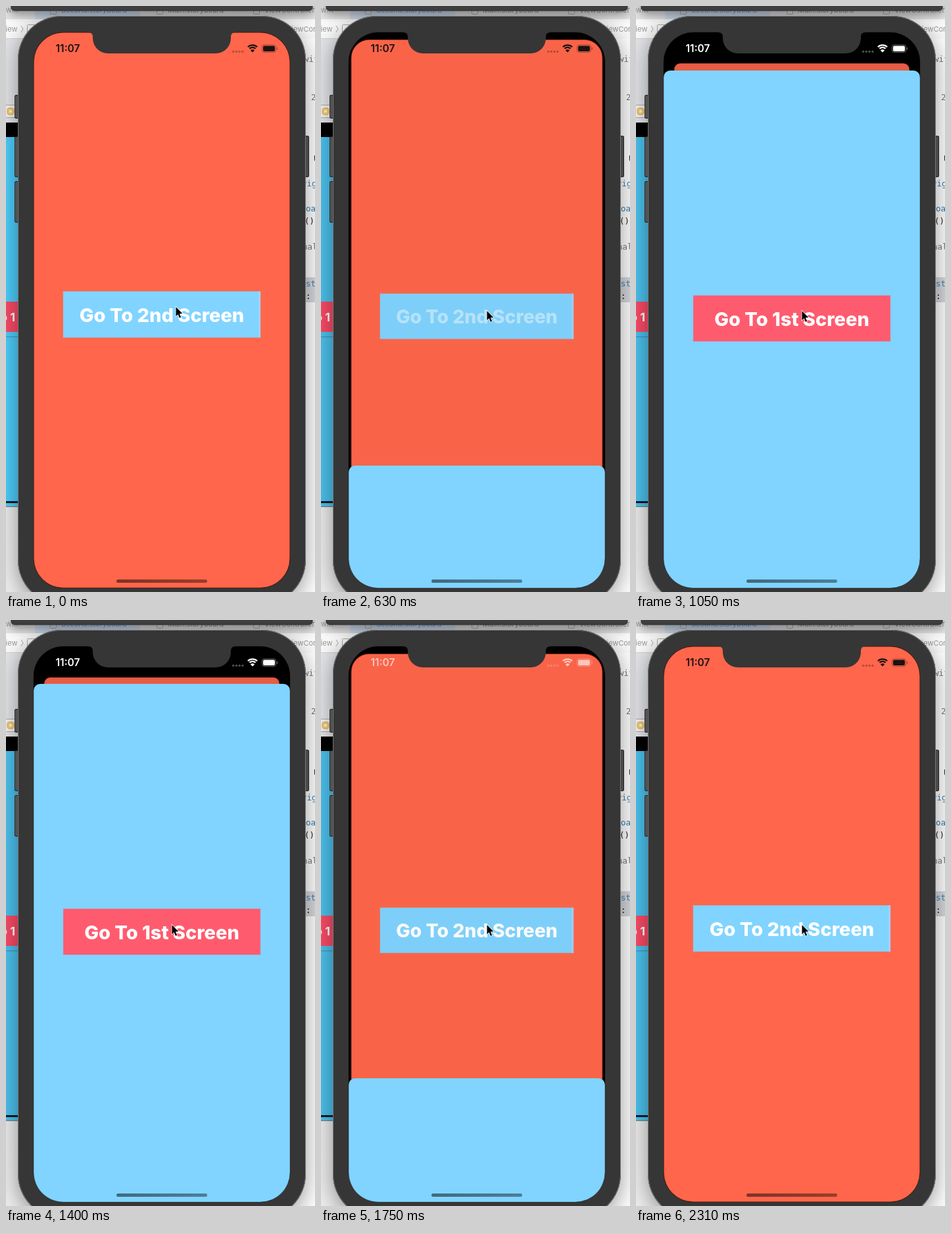
These frames come from a looping animation (470 px wide and 890 px high, 2.38 s). An HTML page with a canvas:

```html
<!DOCTYPE html>
<html lang="en">
<head>
<meta charset="utf-8">
<title>Screen transition</title>
<style>
html, body { margin: 0; width: 100%; height: 100%; overflow: hidden; background: #e6e6e8; }
canvas { display: block; width: 470px; height: 890px; }
</style>
</head>
<body>
<canvas id="stage"></canvas>
<script>
const W = 470, H = 890, LOOP = 2380, STEP = 70;
const OPEN = 581, CLOSE = 1604;
const SANS = 'Inter, "Liberation Sans", sans-serif';
const MONO = '"DejaVu Sans Mono", monospace';
const SKY = '#80d4ff', TOMATO = '#ff664b', ROSE = '#ff5b6e', BODY = '#363636';

const canvas = document.getElementById('stage');
const ctx = canvas.getContext('2d');
const dpr = window.devicePixelRatio || 1;
canvas.width = W * dpr;
canvas.height = H * dpr;

const clamp = v => Math.max(0, Math.min(1, v));
const mix = (a, b, p) => a + (b - a) * p;

// Critically damped spring, ms since start -> 0..1
function spring(ms) {
  const x = 0.01886 * Math.max(0, ms);
  return 1 - (1 + x) * Math.exp(-x);
}

function rect(x, y, w, h, fill) {
  ctx.fillStyle = fill;
  ctx.fillRect(x, y, w, h);
}

function round(x, y, w, h, r, fill, stroke, line = 1) {
  ctx.beginPath();
  ctx.roundRect(x, y, w, h, r);
  if (fill) { ctx.fillStyle = fill; ctx.fill(); }
  if (stroke) { ctx.strokeStyle = stroke; ctx.lineWidth = line; ctx.stroke(); }
}

function text(str, x, y, font, fill, align = 'left') {
  ctx.font = font;
  ctx.fillStyle = fill;
  ctx.textAlign = align;
  ctx.fillText(str, x, y);
}

function fade(x0, y0, x1, y1, from, to) {
  const g = ctx.createLinearGradient(x0, y0, x1, y1);
  g.addColorStop(0, from);
  g.addColorStop(1, to);
  return g;
}

function shadowed(alpha, blur, dy, paint) {
  ctx.save();
  ctx.shadowColor = `rgba(0,0,0,${alpha})`;
  ctx.shadowBlur = blur * dpr;
  ctx.shadowOffsetY = dy * dpr;
  paint();
  ctx.restore();
}

function drawTabs() {
  const small = '11px ' + SANS;
  rect(0, 0, W, 20, '#e4e4e6');
  rect(44, 0, 160, 20, '#cfdcec');
  text('swift', -6, 10, small, '#999');
  text('Second.storyboard', 84, 10, small, '#5b9fe8');
  text('Main.storyboard', 246, 10, small, '#888');
  text('ViewController', 393, 10, small, '#888');
  for (const x of [67, 229, 376]) round(x + .5, 2.5, 9, 10, 1, null, '#aaa');
  rect(0, 20, W, 30, '#fafafa');
  text('View', -8, 39, small, '#999');
  text('〉', 22, 39, '11px "Noto Sans CJK SC", sans-serif', '#999');
  round(32.5, 28.5, 12, 13, 1, null, '#aaa');
  text('ViewController', 427, 39, small, '#999');
}

function drawLeftPane(blue) {
  rect(0, 50, 40, H - 50, fade(0, 50, 0, H, '#e2e4e8', '#ededed'));
  rect(0, 49, 40, 1, '#cfcfcf');
  rect(0, 150, 20, 20, '#f4f4f4');
  rect(0, 150, 20, 1, '#aaa');
  rect(0, 169, 20, 1, '#aaa');
  round(2, 155, 10, 10, 3, '#f6ce77', '#d9aa4d');
  round(5, 158, 4, 4, 2, '#fff6dd');
  rect(0, 177, 20, 22, '#000');
  rect(0, 199, 20, 561, blue);
  rect(0, 449, 20, 46, '#fb4b66');
  text('o 1', -9, 479, 'bold 18px ' + SANS, '#fff');
  rect(0, 502, 20, 1, 'rgba(60,90,110,.5)');
  rect(0, 752, 20, 3, '#101820');
  rect(0, 760, 20, 1, '#777');
}

function drawCode() {
  rect(430, 50, 40, H - 50, '#fff');
  rect(430, 412, 40, 38, '#d6d7dc');
  const rows = [
    ['wif', 453, 85, '#777'], ['2', 464, 143, '#777'], ['U', 468, 236, '#333'],
    ['vig', 450, 274, '#3a7fae'], ['oa', 456, 312, '#2f78ac'], ['()', 454, 331, '#222'],
    ['nal', 451, 370, '#777'], ['st', 456, 426, '#3a7fae'], [':', 456, 445, '#111']
  ];
  for (const [str, x, y, fill] of rows) text(str, x, y, '12.5px ' + MONO, fill);
}

function drawDesktop(t) {
  drawTabs();
  drawCode();
  drawLeftPane(t < OPEN ? '#4ccdfb' : '#4bc1ed');
  shadowed(.4, 34, 8, () => round(18, 15, 438, 893, 66, BODY));
  shadowed(.45, 16, 4, () => round(8, -10, 458, 17, 5, '#404040', '#2b2b2b'));
}

function drawSideKey(x, y, h) {
  round(x + .5, y + .5, 9, h - 1, 1.5, '#4a4a4a', '#222');
  rect(x + 1.5, y + 1.5, 1, h - 3, '#696969');
}

function drawBody() {
  drawSideKey(13, 135, 36);
  drawSideKey(13, 198, 62);
  drawSideKey(13, 266, 63);
  drawSideKey(451, 197, 63);
  round(18.5, 15.5, 437, 892, 66, BODY, '#777');
}

function drawNotch() {
  ctx.beginPath();
  ctx.moveTo(125, 39);
  ctx.lineTo(125, 40);
  ctx.quadraticCurveTo(132, 40, 132, 47);
  ctx.arcTo(132, 72, 156, 72, 23);
  ctx.lineTo(319, 72);
  ctx.arcTo(342, 72, 342, 47, 23);
  ctx.lineTo(342, 47);
  ctx.quadraticCurveTo(342, 40, 349, 40);
  ctx.lineTo(349, 39);
  ctx.fillStyle = BODY;
  ctx.fill();
}

function drawButton(label, y, fill, edge, alpha) {
  rect(87, y, 300, 70, fill);
  ctx.strokeStyle = edge;
  ctx.lineWidth = 1;
  ctx.strokeRect(87, y, 300, 70);
  ctx.globalAlpha = alpha;
  text(label, 237, y + 46, '800 29px ' + SANS, '#fff', 'center');
  ctx.globalAlpha = 1;
}

function drawFirst(p, alpha) {
  const s = mix(1, 358 / 390, p);
  ctx.save();
  ctx.translate(237, 40 + 47 * p);
  ctx.scale(s, s);
  ctx.translate(-237, -40);
  round(42, 40, 390, 844, mix(45, 10, Math.sqrt(p)), TOMATO, 'rgba(70,10,0,.55)', 1.5);
  drawButton('Go To 2nd Screen', 433.5, SKY, 'rgba(165,180,205,.6)', alpha);
  rect(384, 433.5, 3, 70, 'rgba(190,210,245,.55)');
  ctx.restore();
  rect(42, 40, 390, 844, `rgba(0,0,0,${.1 * p})`);
}

function drawSecond(p, alpha) {
  const y = Math.round(mix(884, 97, p));
  if (y >= 884) return;
  round(42, y, 390, 800, [10, 10, 0, 0], SKY);
  drawButton('Go To 1st Screen', y + 341.5, ROSE, 'rgba(190,160,200,.6)', alpha);
}

function drawStatus(color, alpha) {
  if (alpha <= 0) return;
  ctx.globalAlpha = alpha;
  text('11:07', 94, 70, '600 15.5px ' + SANS, color, 'center');
  ctx.strokeStyle = color;
  ctx.lineWidth = 2.3;
  for (const r of [6.4, 10]) {
    ctx.beginPath();
    ctx.arc(375, 69.3, r, -Math.PI * .75, -Math.PI * .25);
    ctx.stroke();
  }
  ctx.beginPath();
  ctx.moveTo(375, 70.5);
  ctx.arc(375, 70.5, 4.4, -Math.PI * .75, -Math.PI * .25);
  ctx.fillStyle = color;
  ctx.fill();
  round(391, 60.5, 18, 8.5, 2, color);
  ctx.globalAlpha = alpha * .4;
  round(389.5, 59, 21, 11.5, 3.2, null, color);
  round(411.8, 62.8, 1.4, 4, .7, color);
  ctx.globalAlpha = alpha * .3;
  for (let i = 0; i < 4; i++) round(344 + i * 4.7, 67.5, 3.4, 3.4, 1.7, color);
  ctx.globalAlpha = 1;
}

function drawCursor(t, ring) {
  const p = clamp(t / 280);
  const x = mix(258, 252, p), y = mix(456.5, 462.5, p);
  if (ring) {
    for (const [line, color] of [[5, 'rgba(255,255,255,.85)'], [3, '#000']]) {
      ctx.beginPath();
      ctx.arc(x, y + 1.5, 20, 0, Math.PI * 2);
      ctx.lineWidth = line;
      ctx.strokeStyle = color;
      ctx.stroke();
    }
  }
  const arrow = [[0, 0], [0, 14], [3.2, 11], [5.5, 16.5], [7.6, 15.5], [5.4, 10.2], [9.8, 9.9]];
  ctx.beginPath();
  for (const [dx, dy] of arrow) ctx.lineTo(x + .5 + dx, y + .7 + dy);
  ctx.closePath();
  ctx.lineWidth = 1.6;
  ctx.strokeStyle = 'rgba(255,255,255,.85)';
  ctx.stroke();
  ctx.fillStyle = '#000';
  ctx.fill();
}

// Label dims while pressed, then recovers
function pressAlpha(t, down, up) {
  if (t < down) return 1;
  return t < up ? .2 : mix(.2, 1, clamp((t - up) / 220));
}

function draw(t) {
  const closing = t >= CLOSE;
  const p = closing ? 1 - spring(t - CLOSE) : spring(t - OPEN);
  ctx.setTransform(dpr, 0, 0, dpr, 0, 0);
  ctx.clearRect(0, 0, W, H);
  drawDesktop(t);
  drawBody();

  ctx.save();
  ctx.beginPath();
  ctx.roundRect(42, 40, 390, 844, 45);
  ctx.clip();
  rect(42, 40, 390, 844, '#000');
  drawFirst(p, closing ? 1 : pressAlpha(t, 450, 560));
  drawSecond(p, pressAlpha(t, 1500, 1590));
  ctx.restore();

  round(42, 40, 390, 844, 45, null, 'rgba(30,10,8,.35)');
  drawNotch();

  if (closing) {
    const q = clamp((t - CLOSE) / 400);
    drawStatus('#fff', 1 - q);
    drawStatus('#1c1210', clamp(2 * q - 1));
  } else {
    const q = clamp((t - OPEN - 50) / 230);
    drawStatus('#1c1210', 1 - q);
    drawStatus('#fff', q);
  }
  round(168, 871, 138, 5, 2.5, fade(168, 0, 306, 0, 'rgba(0,0,0,.5)', 'rgba(0,0,0,.4)'));
  drawCursor(t, (t >= 420 && t < 560) || (t >= 1470 && t < 1590));
}

const start = performance.now();
function tick() {
  const t = (performance.now() - start) % LOOP;
  draw(Math.floor((t + 4) / STEP) * STEP % LOOP);
  requestAnimationFrame(tick);
}
tick();
</script>
</body>
</html>
```
